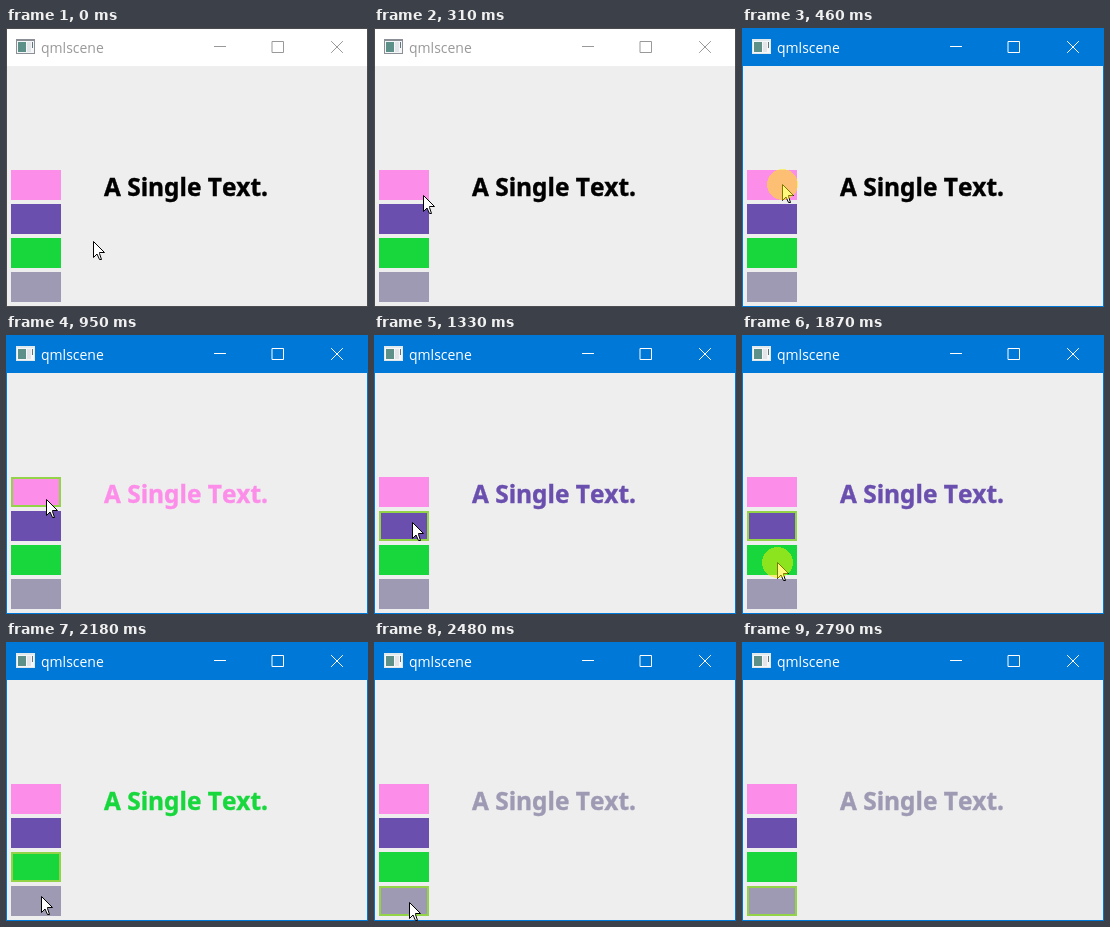
These frames come from a looping animation (362x279 px, 2.87 s). An HTML page:

```html
<!DOCTYPE html>
<html lang="en">
<head>
<meta charset="utf-8">
<title>qmlscene</title>
<style>
  html, body { margin: 0; width: 100%; height: 100%; overflow: hidden; }
  svg { display: block; }
  #window { --bar: #fff; --edge: #4c4c50; --text: #999; --icon: #8b9096; }
  #window.active { --bar: #0078d7; --edge: #0078d7; --text: #fff; --icon: #dfe8ec; }
  .edge { fill: var(--edge); }
  .bar { fill: var(--bar); }
  .icon { fill: var(--icon); }
  .title { font: 14px "Open Sans", "Noto Sans", sans-serif; fill: var(--text); }
  .glyphs { fill: none; stroke: var(--text); stroke-linecap: square; }
  #label {
    font: bold 24.4px "Noto Sans", "Open Sans", sans-serif; font-kerning: none;
    text-anchor: middle; fill: var(--ink); stroke: var(--ink); stroke-width: .4;
  }
  #frame { fill: none; stroke: #92d348; stroke-width: 2; }
  #press { fill: #fff200; opacity: .5; }
</style>
</head>
<body>
<svg id="window" width="362" height="279" viewBox="0 0 362 279">
  <rect class="edge" width="362" height="279"/>
  <rect class="bar" x="1" y="1" width="360" height="37"/>
  <rect x="1" y="38" width="360" height="240" fill="#eee"/>

  <g shape-rendering="crispEdges">
    <rect class="icon" x="10" y="11" width="19" height="15"/>
    <rect x="11" y="13" width="17" height="12" fill="#f4f6f7"/>
    <rect x="12" y="14" width="8" height="10" fill="#5c9088"/>
    <rect x="21" y="14" width="4" height="10" fill="#e2e6e8"/>
    <rect x="26" y="14" width="1" height="6" fill="#62767e"/>
  </g>
  <text class="title" x="35" y="25">qmlscene</text>
  <g class="glyphs">
    <path d="M208.5 18.5h11M266.5 13.5h11v11h-11z"/>
    <path d="M325.5 13.5l11 11M336.5 13.5l-11 11"/>
  </g>

  <g id="swatches"></g>
  <rect id="frame" x="6" width="48" height="28"/>
  <text id="label" x="180" y="168">A Single Text.</text>

  <g id="pointer">
    <path d="M.5 .5V16.5L4 13L6.5 18.5H8.5L6.5 12.5V11.5H11.5Z" fill="#fff" stroke="#000"/>
    <circle id="press" cx=".5" cy=".5" r="15.5" shape-rendering="crispEdges"/>
  </g>
</svg>
<script>
  const LOOP = 2870, STEP = 76;
  const home = { x: 87, y: 213 };

  // The pointer goes to each swatch in a few steps, then presses and releases
  const visits = [
    { color: "#fc8eea", start: 80, steps: 5, x: 40, y: 156, down: 460, up: 630 },
    { color: "#6a4fae", start: 950, steps: 4, x: 38, y: 187, down: 1250, up: 1330 },
    { color: "#17d73c", start: 1410, steps: 6, x: 35, y: 227, down: 1870, up: 1940 },
    { color: "#9e9ab4", start: 2020, steps: 3, x: 35, y: 254, down: 2330, up: 2410 }
  ];
  const exit = { start: 2480, steps: 5, x: 34, y: 282 };

  const rowY = i => 142 + 34 * i;
  const $ = id => document.getElementById(id);

  $("swatches").innerHTML = visits.map((v, i) =>
    `<rect x="5" y="${rowY(i)}" width="50" height="30" fill="${v.color}"/>`).join("");

  function pointerAt(t) {
    let { x, y } = home;
    for (const leg of [...visits, exit]) {
      if (t < leg.start) break;
      // The 6 ms lead keeps steps on the 10 ms grid
      const step = 1 + Math.floor((t - leg.start + 6) / STEP);
      const part = Math.min(1, step / leg.steps);
      x += (leg.x - x) * part;
      y += (leg.y - y) * part;
    }
    return [x, y].map(Math.round);
  }

  function draw(t) {
    const chosen = visits.findLastIndex(v => t >= v.up);
    const down = visits.some(v => t >= v.down && t < v.up);

    $("window").classList.toggle("active", t >= visits[0].down);
    $("pointer").setAttribute("transform", `translate(${pointerAt(t)})`);
    $("press").style.display = down ? "" : "none";
    $("label").style.setProperty("--ink", visits[chosen]?.color ?? "#000");
    $("frame").style.display = chosen < 0 ? "none" : "";
    $("frame").setAttribute("y", rowY(chosen) + 1);
  }

  const start = performance.now();
  function tick() {
    draw((performance.now() - start) % LOOP);
    requestAnimationFrame(tick);
  }
  draw(0);
  requestAnimationFrame(tick);
</script>
</body>
</html>
```
